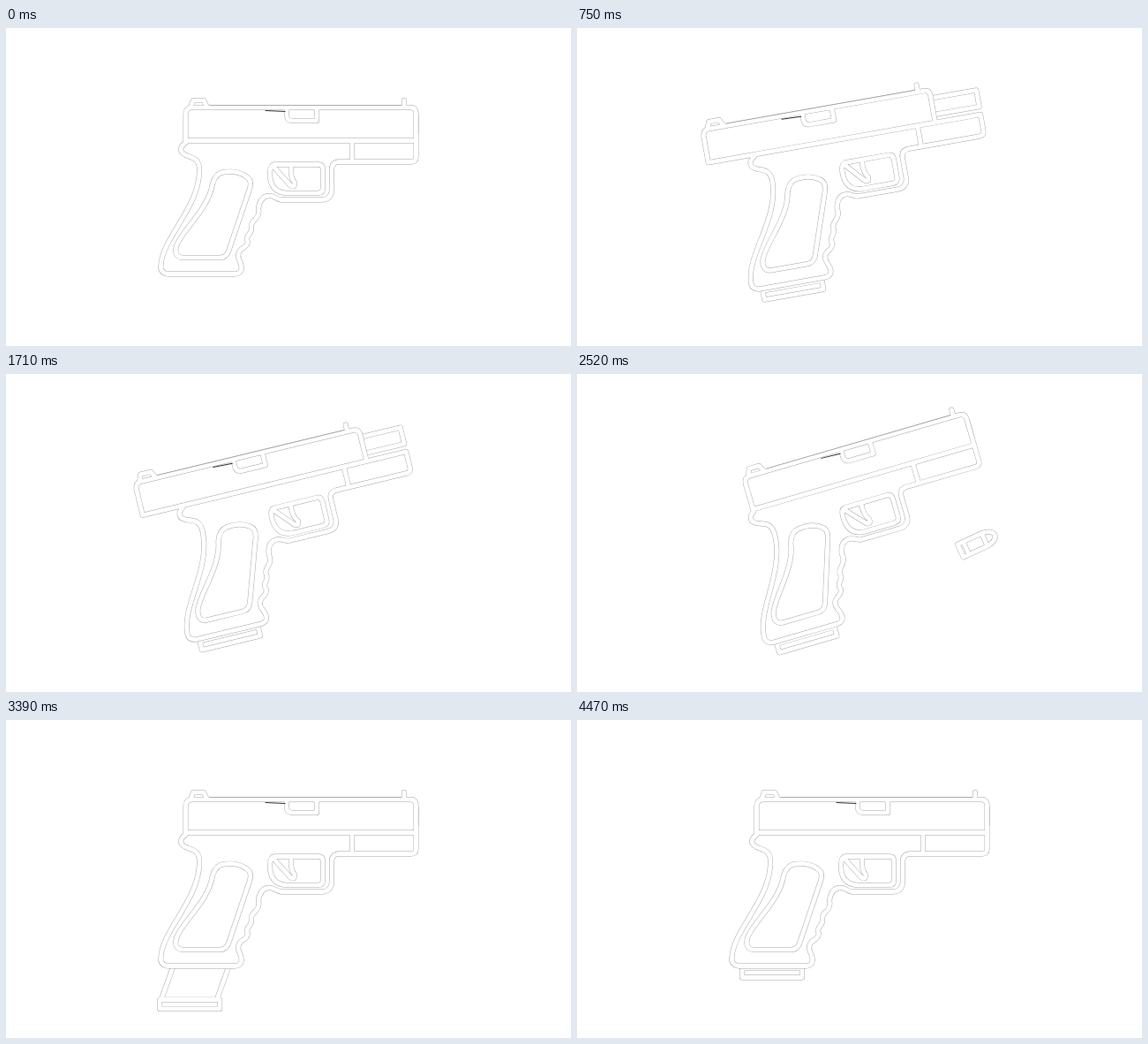
Write an HTML page with a canvas that moves like this. It is 640 px wide and 360 px high and loops after 4.5 s.

```html
<!DOCTYPE html>
<html>
<head>
<meta charset="utf-8">
<style>
html, body { margin: 0; width: 100%; height: 100%; overflow: hidden; background: #fff; }
canvas { display: block; }
</style>
</head>
<body>
<canvas id="stage" width="640" height="360"></canvas>
<script>
const ctx = document.getElementById('stage').getContext('2d');
const LOOP = 4500, CYCLE = 3150;
const PIVOT = [292, 155];

const frame = new Path2D(`M203.5 127.5 H464.5 V146 Q464.5 151.5 459 151.5 H377
  Q369 152 369 160 V184 Q368 194.5 357 194.5 H312 C306 194 304 189 297 190
  Q288 191 286 204 Q288 212 281 218 Q277 222 278 227 Q278 231 274 235
  Q272 239 274 242 Q273 247 267 250 Q261 255 264 262 Q271 277 260 278.5
  H183 Q174 277 175.5 268 C178 237 216 206 219 165 C221 145 208 147 203 143.5
  C196 140 197 134 203.5 130 Z M392 127.5 V151.5
  M304 154.5 H354 Q359 154.5 359 160 V181 Q359 187 353 187 H318
  Q299 186 299 165 Q299 155 304 154.5 Z
  M304 158 L322 178 Q327 182 327 175 Q322 170 323 156
  M247 163 Q262 161 272 168 Q279 172 276 182 L252 253 Q249 260 242 260 H200
  Q190 259 193 247 C198 230 230 205 234 176 Q238 164 247 163 Z`);
const slide = new Path2D(`M203.5 127.5 V97 Q204 90 211 90 H458 Q464.5 90 464.5 97
  V127.5 Z M209 90 L212 82 H224 L228 90 M451 90 V82
  M318 92 V100 Q319 105 324 105 H352 V91`);
const barrel = new Path2D('M375 99.5 H464.5 V118.5 H375 Z');
const magazine = new Path2D('M187 281 H255 V291.5 H187 Z M189 280 L216 205 H279 L252 280');
const cartridge = new Path2D(`M-21 -8 H8 Q21 -7 22 0 Q21 7 8 8 H-21 Z
  M-14 -8 V8 M9 -8 V8`);

const ramp = (t, a, b) => Math.min(1, Math.max(0, (t - a) / (b - a)));
const ease = (t, a, b) => (1 - Math.cos(Math.PI * ramp(t, a, b))) / 2;
const pulse = (t, a, b, c, d) => ease(t, a, b) - ease(t, c, d);

// White strokes with a fine grey rim on both sides
function outline(path) {
  ctx.fillStyle = '#fff';
  ctx.fill(path);
  ctx.strokeStyle = '#a4a4a4';
  ctx.lineWidth = 5.8;
  ctx.stroke(path);
  ctx.strokeStyle = '#fff';
  ctx.lineWidth = 4.9;
  ctx.stroke(path);
}

function line(x1, y1, x2, y2, color, width) {
  ctx.strokeStyle = color;
  ctx.lineWidth = width;
  ctx.beginPath();
  ctx.moveTo(x1, y1);
  ctx.lineTo(x2, y2);
  ctx.stroke();
}

function rotateAbout([x, y], degrees) {
  ctx.translate(x, y);
  ctx.rotate(degrees * Math.PI / 180);
  ctx.translate(-x, -y);
}

function drawGun(t) {
  const tilt = -10 * pulse(t, 500, 750, 960, 1260) - 16.2 * pulse(t, 1380, 1830, 2530, 2750);
  const back = 60 * pulse(t, 560, 810, 850, 1000) + 60 * pulse(t, 1480, 1820, 2250, 2430);
  const drop = 160 * ((1 - ramp(t, 0, 456)) ** 2 + ramp(t, 2730, 3120) ** 2);

  ctx.save();
  rotateAbout(PIVOT, tilt);

  ctx.save();
  ctx.translate(-drop * 13 / 36, drop);
  outline(magazine);
  ctx.restore();

  outline(barrel);
  const body = new Path2D(frame);
  body.addPath(slide, new DOMMatrix([1, 0, 0, 1, -back, 0]));
  outline(body);

  ctx.translate(-back, 0);
  line(231, 87.5, 448, 87.5, '#888', 0.5);
  line(294, 93.5, 316, 94.5, '#333', 1);
  ctx.restore();
}

function drawCartridge(t) {
  if (t < 2050 || t > 2700) return;
  ctx.save();
  ctx.translate(290 + 0.347 * (t - 2050), 16 + 0.00207 * (t - 2230) ** 2);
  ctx.rotate((-25 + (t - 2520) * 0.1) * Math.PI / 180);
  outline(cartridge);
  ctx.restore();
}

function render(now) {
  const t = (now % LOOP) % CYCLE;
  ctx.clearRect(0, 0, 640, 360);
  ctx.lineJoin = ctx.lineCap = 'round';
  drawGun(t);
  drawCartridge(t);
  requestAnimationFrame(render);
}
requestAnimationFrame(render);
</script>
</body>
</html>
```
